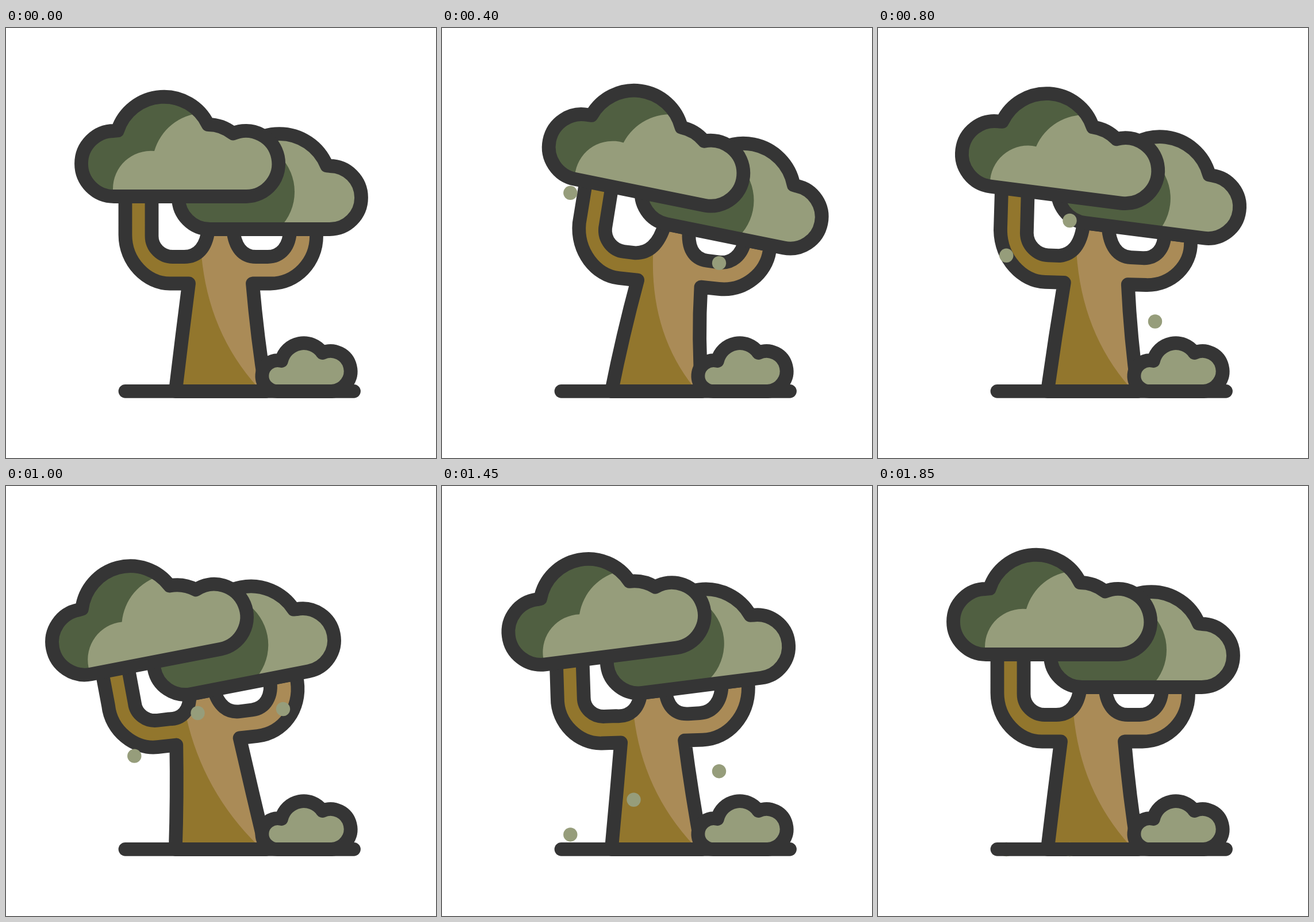
Recreate the animation shown at these times as an HTML page with a canvas. Size 748 by 748 pixels, loop 1900 ms.

```html
<!DOCTYPE html>
<html lang="en">
<head>
<meta charset="utf-8">
<title>Swaying tree</title>
<style>
html, body { margin: 0; height: 100%; overflow: hidden; background: #fff; }
canvas { display: block; }
</style>
</head>
<body>
<canvas id="stage" width="748" height="748"></canvas>
<script>
const ctx = document.getElementById("stage").getContext("2d");
const LOOP = 1900, STEP = 50;
const INK = "#353535", LEAF = "#969d7b", SHADE = "#505f41", WOOD = "#aa8b57", BARK = "#92762d";

const trunk = "M207.5 292 L207.5 360 C207.5 407 245 444.5 285 444.5 L318 444.5 Q306 538 294.8 632 " +
  "L452 632 Q437 538 429 444.5 L460 444.5 C505 444.5 540 407 540 362 L540 350 L494 350 " +
  "C494 380 478 398 455 398 L435 398 C412 398 398 382 395 350 L352 350 " +
  "C348 384 332 398 310 398 L290 398 C270 398 253.5 382 253.5 362 L253.5 292 Z";
const bark = "M340 395 Q352 530 438 625 L250 632 L250 460 L170 460 L170 280 L290 280 L290 390 Z";

const frontCloud = new Path2D("M188 293 A57 57 0 0 1 188 179 L194 178.5 A85 85 0 0 1 351.5 168 " +
  "A70 70 0 0 1 395 183.5 A57 57 0 1 1 418 293 Z");
const frontLight = new Path2D("M186 280 A66 66 0 0 1 258 214 A92 92 0 0 1 340 148 L500 130 V300 H186 Z");
const backCloud = new Path2D("M355 350 A55 55 0 0 1 355 240 L393 240 A89 89 0 0 1 558 239.5 " +
  "L563 240 A55 55 0 0 1 563 350 Z");
const backShade = new Path2D("M250 197 H414 A88 88 0 0 1 414 373 H250 Z");
const bush = new Path2D("M475.5 632 A27 27 0 1 1 479 579 A40 40 0 0 1 550.5 565 A35 35 0 1 1 566.5 632 Z");
const ground = new Path2D("M207.5 631.8 H605");

const clamp = (v, lo, hi) => Math.min(hi, Math.max(lo, v));
const ease = f => (1 - Math.cos(Math.PI * clamp(f, 0, 1))) / 2;

// Rest, full right, full left, rest.
function swing(t, [a, b, c, d]) {
  if (t < b) return ease((t - a) / (b - a));
  if (t < c) return 1 - 2 * ease((t - b) / (c - b));
  return ease((t - c) / (d - c)) - 1;
}

// Rigid move: turn about (cx, cy), then shift.
const pose = (cx, cy, dx, dy, deg) =>
  new DOMMatrix().translate(cx + dx, cy + dy).rotate(deg).translate(-cx, -cy);

const place = (m, x, y) => [m.a * x + m.c * y + m.e, m.b * x + m.d * y + m.f];

function moved(path, m) {
  const out = new Path2D();
  out.addPath(path, m);
  return out;
}

// The trunk bends from its foot; branch tips follow the clouds.
function warp(x, y, sway, front, back) {
  const py = Math.max(y, 445), h = Math.max(0, (620 - py) / 175);
  const stem = place(pose(373, py, 28 * sway * h ** 1.3, 0, 8 * sway * h), x, y);
  const [tip, top] = x < 320 ? [front, 292] : [back, 350];
  const w = clamp((445 - y) / (445 - top), 0, 1) ** 2;
  return place(tip, x, y).map((v, i) => stem[i] + (v - stem[i]) * w);
}

function shape(path, fill, inner, innerFill) {
  ctx.fillStyle = fill;
  ctx.fill(path);
  if (inner) {
    ctx.save();
    ctx.clip(path);
    ctx.fillStyle = innerFill;
    ctx.fill(inner);
    ctx.restore();
  }
  ctx.stroke(path);
}

function leaf(x, y) {
  ctx.fillStyle = LEAF;
  ctx.beginPath();
  ctx.arc(x, y, 12.2, 0, 2 * Math.PI);
  ctx.fill();
}

function rightLeaf(t) {
  const u = t - 300;
  if (t >= 0 && t < 1000) leaf(482, 388 + 0.2 * u + 0.00009 * u * u);
}

function draw(t) {
  const sway = swing(t, [60, 555, 1120, 1612]), sq = sway * sway;
  const turn = 17.2 * swing(t, [90, 600, 1155, 1690]);
  const front = pose(303, 236, 67.5 * sway, 6 * sq - 12.5 * sway, turn);
  const back = pose(460, 295, 57.5 * sway, 5 * sq + 13 * sway, turn);
  const bend = d => new Path2D(d.replace(/([\d.]+) ([\d.]+)/g,
    (_, x, y) => warp(+x, +y, sway, front, back).map(v => v.toFixed(2)).join(" ")));

  ctx.fillStyle = "#fff";
  ctx.fillRect(0, 0, 748, 748);
  ctx.strokeStyle = INK;
  ctx.lineWidth = 23.8;
  ctx.lineJoin = ctx.lineCap = "round";

  shape(bend(trunk), WOOD, bend(bark), BARK);
  rightLeaf(t);
  rightLeaf(t - 700);
  // The shade is cast by the front cloud, so it moves with it.
  shape(moved(backCloud, back), LEAF, moved(backShade, front), SHADE);
  leaf(223.3, 270 + 362 * ease((t - 190) / 1520));
  leaf(333.5, Math.min(632, 395 + 0.335 * (t - 1000) + 0.000175 * Math.max(0, 1000 - t) ** 2));
  shape(moved(frontCloud, front), SHADE, moved(frontLight, front), LEAF);
  shape(bush, LEAF);
  ctx.stroke(ground);
}

const start = performance.now();
function tick() {
  const t = (performance.now() - start) % LOOP;
  draw(Math.floor(t / STEP) * STEP);
  requestAnimationFrame(tick);
}
tick();
</script>
</body>
</html>
```
